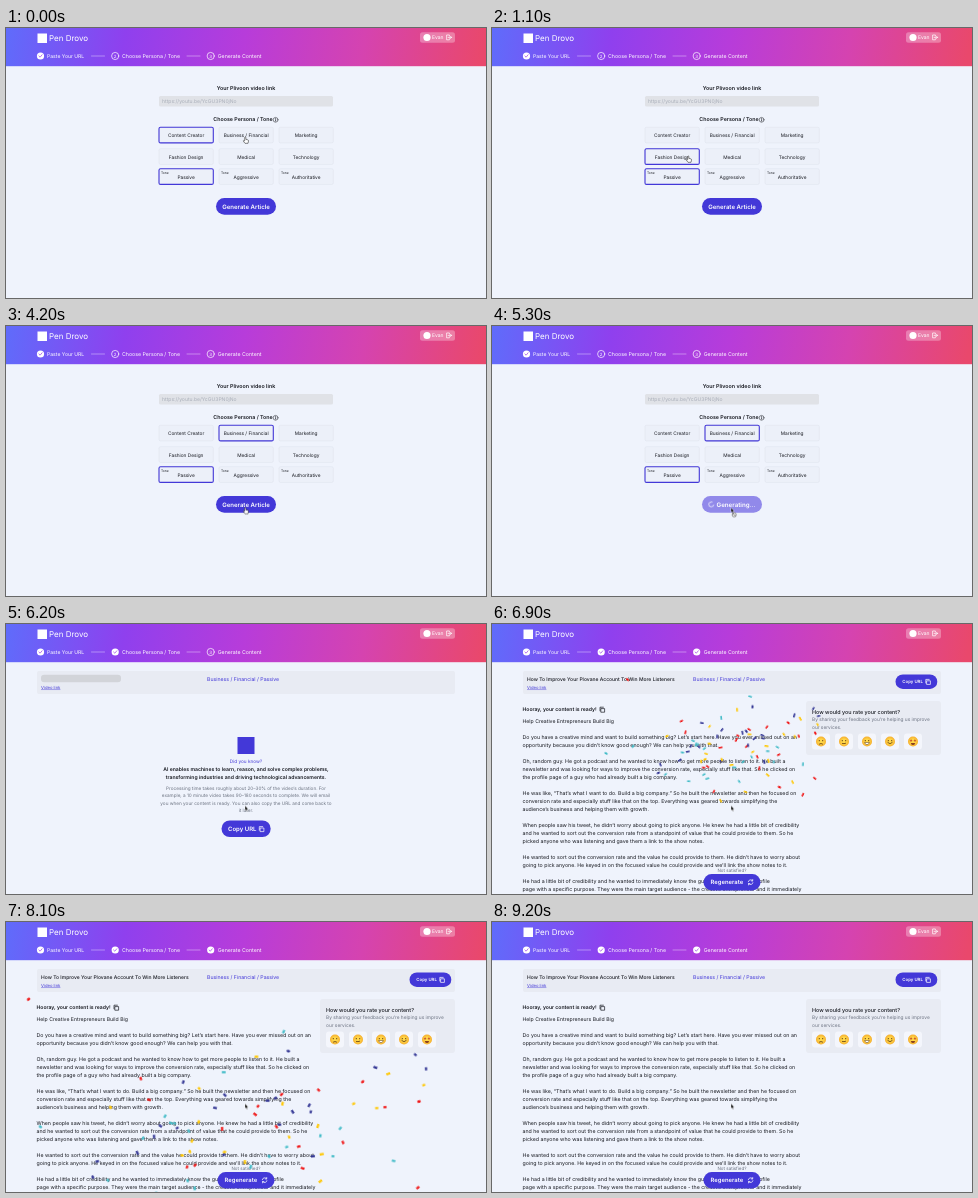
Recreate the animation shown at these times as an HTML page. Size 480x270 px, loop 9300 ms.

```html
<!DOCTYPE html>
<html lang="en">
<head>
<meta charset="utf-8">
<title>Article generator</title>
<style>
  html, body { margin: 0; width: 100%; height: 100%; overflow: hidden; background: #eff3fc; }
  svg { display: block; width: 100%; height: 100%; }
  text { font-family: Inter, sans-serif; text-rendering: geometricPrecision; white-space: pre; }
  .mid { text-anchor: middle; }
  .semi { font-weight: 600; }
  .med { font-weight: 500; }
  .link { text-decoration: underline; }
  .line { fill: none; stroke: currentColor; stroke-width: .7; stroke-linecap: round; stroke-linejoin: round; }

  .spin { animation: spin 1s linear infinite; }
  @keyframes spin { to { transform: rotate(360deg); } }

  .cursor { animation: cursor 9.3s ease-in-out infinite; }
  @keyframes cursor {
    0%, 4% { transform: translate(240px, 112px); }
    9%, 14% { transform: translate(197px, 131px); }
    20.5%, 28% { transform: translate(240px, 111px); }
    33%, 35% { transform: translate(249px, 176px); }
    41%, 100% { transform: translate(240px, 184.5px); }
  }

  .drift { animation: drift 9.3s infinite; }
  @keyframes drift {
    0%, 73.1% { transform: translateX(240px); animation-timing-function: cubic-bezier(.1, .7, .4, 1); }
    80.65% { transform: translateX(var(--x)); animation-timing-function: ease-out; }
    96%, 100% { transform: translateX(calc(var(--x) * 1.15 - 36px)); }
  }
  .fall { animation: fall 9.3s infinite; }
  @keyframes fall {
    0%, 73.1% { transform: translateY(110px); animation-timing-function: cubic-bezier(.1, .7, .4, 1); }
    80.65% { transform: translateY(var(--y)); animation-timing-function: cubic-bezier(.4, .1, .8, .7); }
    96%, 100% { transform: translateY(calc(var(--y) + 270px)); }
  }
  .tumble { animation: tumble 1.55s linear infinite; }
  @keyframes tumble {
    from { transform: rotate(var(--a)) scaleY(1); }
    50% { transform: rotate(calc(var(--a) + 180deg)) scaleY(.55); }
    to { transform: rotate(calc(var(--a) + 360deg)) scaleY(1); }
  }
</style>
</head>
<body>
<svg id="stage" viewBox="0 0 480 270"></svg>
<script>
const LOOP = 9.3, LOADING = 5.95, READY = 6.8;
const INDIGO = '#4338d8', INK = '#16181f', GRAY = '#6b7280', PANEL = '#e8ebf3';
const rules = [];

// Shows its content only between two times (seconds) of the loop.
function during(from, to, content) {
  const name = 'show' + rules.length;
  const pct = s => (s / LOOP * 100).toFixed(3) + '%';
  rules.push(`@keyframes ${name}{0%{visibility:hidden}` +
    `${pct(from)}{visibility:visible}${to < LOOP ? pct(to) + '{visibility:hidden}' : ''}` +
    `100%{visibility:${to < LOOP ? 'hidden' : 'visible'}}}`);
  return `<g style="animation:${name} ${LOOP}s step-end infinite">${content}</g>`;
}

const text = (x, y, str, size = 5.15, fill = INK, cls = '') =>
  `<text x="${x}" y="${y}" font-size="${size}" fill="${fill}" class="${cls}">${str}</text>`;
const box = (x, y, w, h, r, fill, extra = '') =>
  `<rect x="${x}" y="${y}" width="${w}" height="${h}" rx="${r}" fill="${fill}" ${extra}/>`;
const at = (x, y, content, color = '#fff') =>
  `<g transform="translate(${x} ${y})" color="${color}">${content}</g>`;
const lines = (x, y, step, list, ...style) =>
  list.map((s, i) => text(x, y + i * step, s, ...style)).join('');

const copyIcon = '<path class="line" d="M-1-1h3.4v3.6H-1zM-2.2 1.2V-2.4H1.2"/>';

function header() {
  const check = x => `<circle cx="${x}" cy="28" r="3.6" fill="#fff"/>` +
    at(x, 28, '<path class="line" d="M-1.6 0l1.2 1.2L1.6-1.2"/>', '#9a3ce4');
  const number = (x, n) => `<circle cx="${x}" cy="28" r="3.6" class="line"/>` +
    text(x, 29.6, n, 4.4, '#fff', 'mid');
  const dash = x => `<path d="M${x} 28h13" class="line" opacity=".75" style="stroke-width:.5"/>`;
  return box(0, 0, 480, 38.2, 0, 'url(#sky)') + at(0, 0,
    box(31.5, 5.5, 9.5, 9.5, 0, '#fff') + text(43, 13, 'Pen Drovo', 8, '#fff') +
    check(34.5) + text(41, 29.9, 'Paste Your URL', 5.1, '#fff') + dash(85.5) +
    during(0, LOADING, number(109.2, 2)) + during(LOADING, LOOP, check(109.2)) +
    text(116, 29.9, 'Choose Persona / Tone', 5.25, '#fff') + dash(181) +
    during(0, READY, number(204.7, 3)) + during(READY, LOOP, check(204.7)) +
    text(211.7, 29.9, 'Generate Content', 5.25, '#fff') +
    box(414, 4.3, 35, 10.4, 2.5, '#fff', 'opacity=".3"') +
    '<circle cx="421" cy="9.5" r="3.6" fill="#fff"/>' + text(426, 11.3, 'Evan', 5, '#fff') +
    at(443, 9.4, '<path class="line" d="M.4-1.3V-2.4H-2.4V2.4H.4V1.3M-.9 0H2.6M1.5-1.1L2.6 0 1.5 1.1"/>'));
}

function form() {
  const cols = [153, 213, 273], rows = [99.2, 120.7, 140.7];
  const labels = ['Content Creator', 'Business / Financial', 'Marketing', 'Fashion Design', 'Medical',
    'Technology', 'Passive', 'Aggressive', 'Authoritative'];
  const place = i => [cols[i % 3], rows[i / 3 | 0]];
  const ring = i => box(...place(i), 54.3, 15.7, 1.5, 'none', `stroke="${INDIGO}" stroke-width="1.1"`);
  const cards = labels.map((label, i) => {
    const [x, y] = place(i);
    return box(x, y, 54.3, 15.7, 1.5, '#ecf0f9', 'stroke="#dce0ea" stroke-width=".5"') +
      text(x + 27.1, y + 9.8, label, 4.8, INK, 'mid') +
      (i > 5 ? text(x + 2, y + 5.4, 'Tone', 3.3) : '');
  }).join('');
  const spinner = at(219.3, 178.4, '<path class="line spin" d="M0-2.5A2.5 2.5 0 1 1-2.5 0"/>');
  const button = fill => box(210, 170, 60, 16.8, 8.4, fill);
  return text(240, 61.8, 'Your Plivoon video link', 5.35, INK, 'mid semi') +
    box(153, 68, 174, 10.6, 1.5, '#e0e2e7') +
    text(156, 75.1, 'https://youtu.be/YcGU3PN0jNo', 5.05, '#a9aeb9') +
    text(237, 93.3, 'Choose Persona / Tone', 5.3, INK, 'mid semi') +
    at(269.6, 91.8, '<circle r="2.4" class="line" style="stroke-width:.5"/><path class="line" d="M0-.2V1.2M0-1.2v.01"/>', INK) +
    cards + ring(6) +
    during(0, .35, ring(0)) + during(.35, .95, ring(1)) +
    during(.95, 1.95, ring(3)) + during(1.95, LOADING, ring(1)) +
    during(0, 4.6, button(INDIGO) + text(240, 180.5, 'Generate Article', 6.05, '#fff', 'mid semi')) +
    during(4.6, LOADING, button('#9189ea') + spinner + text(224.5, 180.5, 'Generating...', 6.2, '#fff', 'semi'));
}

const summary = () => box(31, 47, 418, 23, 2, PANEL) +
  text(35, 64.6, 'Video link', 4.2, INDIGO, 'link') +
  text(201, 56.6, 'Business / Financial / Passive', 5.2, INDIGO);

function loading() {
  return summary() + box(35, 50.8, 80, 7.4, 3.2, '#d2d4d9') +
    box(231.5, 113, 17, 17, 0, INDIGO) +
    text(240, 139, 'Did you know?', 4.7, INDIGO, 'mid') +
    lines(240, 147, 7.8, [
      'AI enables machines to learn, reason, and solve complex problems,',
      'transforming industries and driving technological advancements.'], 5.1, INK, 'mid semi') +
    lines(240, 166, 7.3, [
      'Processing time takes roughly about 20–30% of the video’s duration. For',
      'example, a 10 minute video takes 90–180 seconds to complete. We will email',
      'you when your content is ready. You can also copy the URL and come back to',
      'it later.'], 4.68, GRAY, 'mid') +
    box(215.5, 196.4, 49.2, 16.7, 8.3, INDIGO) +
    text(222, 207, 'Copy URL', 6, '#fff', 'semi') + at(255.5, 205, copyIcon);
}

function ratings() {
  const dots = '<path d="M-1.7-1v.3M1.7-1v.3" stroke="#5b3510" stroke-width="1.1" stroke-linecap="round"/>';
  const mouth = d => `<path d="${d}" fill="none" stroke="#5b3510" stroke-width=".8" stroke-linecap="round"/>`;
  const star = x => `<path transform="translate(${x} -1.1)" d="M0-1.5L.4-.4 1.5-.3.7.4 1 1.4 0 .8-1 1.4-.7.4-1.5-.3-.4-.4z" fill="#c9552b"/>`;
  const faces = [
    dots + mouth('M-1.6 2.5Q0 1.3 1.6 2.5'),
    dots + mouth('M-1.6 2Q0 2.5 1.6 1.8'),
    dots + '<path d="M-2.4 1h4.8Q1.6 3.2 0 3.2T-2.4 1z" fill="#fff" stroke="#5b3510" stroke-width=".5"/>',
    dots + mouth('M-2.2 1.1Q0 3.6 2.2 1.1'),
    star(-1.9) + star(1.9) + '<path d="M-2.2 1.4h4.4Q1.6 3.6 0 3.6T-2.2 1.4z" fill="#8a4020"/>'];
  return box(314, 77, 135, 54, 3, PANEL) +
    text(320, 89.6, 'How would you rate your content?', 5.4, INK, 'med') +
    lines(320, 97.4, 7.2, ['By sharing your feedback you’re helping us improve', 'our services.'], 4.8, GRAY) +
    faces.map((face, i) => at(329 + i * 23, 117.5, box(-9, -8, 18, 16, 3, '#f4f6fc') +
      '<circle r="5" fill="url(#face)"/>' + face)).join('');
}

function article() {
  const paragraphs = [
    ['Do you have a creative mind and want to build something big? Let’s start here. Have you ever missed out on an',
      'opportunity because you didn’t know good enough? We can help you with that.'],
    ['Oh, random guy. He got a podcast and he wanted to know how to get more people to listen to it. He built a',
      'newsletter and was looking for ways to improve the conversion rate, especially stuff like that. So he clicked on',
      'the profile page of a guy who had already built a big company.'],
    ['He was like, “That’s what I want to do. Build a big company.” So he built the newsletter and then he focused on',
      'conversion rate and especially stuff like that on the top. Everything was geared towards simplifying the',
      'audience’s business and helping them with growth.'],
    ['When people saw his tweet, he didn’t worry about going to pick anyone. He knew he had a little bit of credibility',
      'and he wanted to sort out the conversion rate from a standpoint of value that he could provide to them. So he',
      'picked anyone who was listening and gave them a link to the show notes.'],
    ['He wanted to sort out the conversion rate and the value he could provide to them. He didn’t have to worry about',
      'going to pick anyone. He keyed in on the focused value he could provide and we’ll link the show notes to it.'],
    ['He had a little bit of credibility and he wanted to immediately know the guests and they had a profile',
      'page with a specific purpose. They were the main target audience - the creative entrepreneur and it immediately']];
  let y = 115.2;
  const body = paragraphs.map(p => {
    const block = lines(30.5, y, 8, p, 5.26);
    y += (p.length + 1) * 8;
    return block;
  }).join('');
  return summary() + text(35, 56.7, 'How To Improve Your Plovane Account To Win More Listeners', 5, INK, 'med') +
    box(403.5, 50.4, 41.8, 14.6, 7.3, INDIGO) +
    text(410.3, 59.4, 'Copy URL', 4.35, '#fff', 'semi') + at(436, 57.8, copyIcon) +
    text(30.5, 87.3, 'Hooray, your content is ready!', 5.1, INK, 'semi') + at(110.2, 85.6, copyIcon, INK) +
    text(30.5, 99.2, 'Help Creative Entrepreneurs Build Big', 5.15) + body + ratings() +
    text(240, 248, 'Not satisfied?', 4.5, GRAY, 'mid') +
    box(211.5, 250, 57, 16.5, 8.2, INDIGO) +
    text(218.5, 260.3, 'Regenerate', 5.9, '#fff', 'semi') +
    at(258.6, 258.2, '<path class="line" d="M-2.3-.5A2.4 2.4 0 0 1 1.9-1.5M2.3.5A2.4 2.4 0 0 1-1.9 1.5M2.1-2.7V-1.3H.7M-2.1 2.7V1.3H-.7"/>');
}

function confetti() {
  let seed = 11;
  const random = () => (seed = seed * 16807 % 2147483647) / 2147483647;
  const spread = () => random() + random() + random() - 1.5;
  const colors = ['#ffc700', '#f01010', '#2e3191', '#41bbc7'];
  return Array.from({ length: 84 }, (_, i) => {
    const x = 238 + spread() * 165, y = 132 + spread() * 95;
    const w = 2.8 + random() * 1.4, color = colors[i % 4];
    const piece = i % 5 ? box(-w / 2, -1.4, w, 2.8, 0, color) : `<circle r="1.8" fill="${color}"/>`;
    return `<g class="drift" style="--x:${x}px;--y:${y}px;--a:${random() * 360}deg">` +
      `<g class="fall"><g class="tumble">${piece}</g></g></g>`;
  }).join('');
}

function cursor() {
  const style = 'fill="#fff" stroke="#222" stroke-width=".55" stroke-linejoin="round"';
  const hand = `<path ${style} d="M-1.3-2.6Q-.7-3.4-.1-2.6V-.6L1.9-.1Q2.7.2 2.5 1.1L2 3.3H-1L-2.8.9Q-2.5 0-1.3.8z"/>`;
  const arrow = '<path fill="#111" stroke="#fff" stroke-width=".4" d="M-1-2.8V2.1L.1 1.1.9 2.8 1.7 2.4 1 .8H2.4z"/>';
  const blocked = at(2.2, 4.3, '<circle r="2" fill="#fff" stroke="#555" stroke-width=".7"/>' +
    '<path class="line" d="M-1.3-1.3L1.3 1.3"/>', '#555');
  return `<g class="cursor">${during(0, 4.6, hand)}${during(4.6, LOOP, arrow)}${during(4.6, LOADING, blocked)}</g>`;
}

const defs = `<defs>
  <linearGradient id="sky" gradientUnits="userSpaceOnUse" x1="0" y1="0" x2="468" y2="75">
    <stop offset="0" stop-color="#5f6cfb"/><stop offset=".25" stop-color="#8f40ee"/>
    <stop offset=".5" stop-color="#b73cda"/><stop offset=".75" stop-color="#d543b0"/>
    <stop offset="1" stop-color="#e9486c"/>
  </linearGradient>
  <radialGradient id="face"><stop offset=".4" stop-color="#ffd84a"/><stop offset="1" stop-color="#f5ae2e"/></radialGradient>
</defs>`;

const scene = defs + box(0, 0, 480, 270, 0, '#eff3fc') + header() +
  during(0, LOADING, form()) + during(LOADING, READY, loading()) +
  during(READY, LOOP, article()) + during(READY, 8.95, confetti()) + cursor();

const sheet = document.createElement('style');
sheet.textContent = rules.join('\n');
document.head.append(sheet);
document.getElementById('stage').innerHTML = scene;
</script>
</body>
</html>
```
